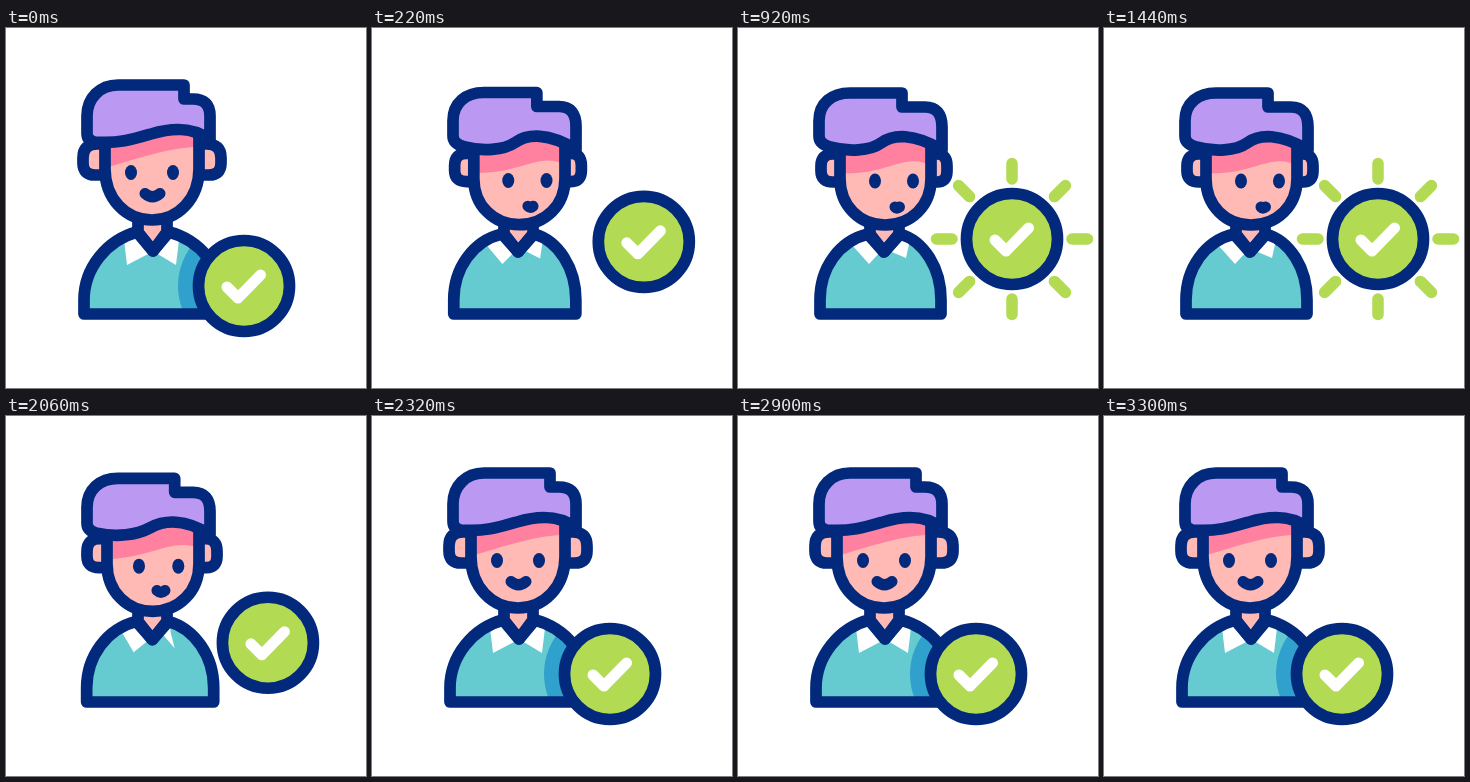
An HTML page with a canvas for the animation above (3.4 s loop, 360 px wide and 360 px high).

```html
<!DOCTYPE html>
<html lang="en">
<head>
<meta charset="utf-8">
<title>Approved user</title>
<style>
  html, body { margin: 0; width: 100%; height: 100%; overflow: hidden; background: #fff; }
  canvas { display: block; }
</style>
</head>
<body>
<canvas id="stage" width="360" height="360"></canvas>
<script>
const ctx = document.getElementById('stage').getContext('2d');
const LOOP = 3400;
const NAVY = '#02297b', SKIN = '#ffbab5', GREEN = '#b2da52', WHITE = '#fff';

// Each shape: path at rest, path when turned towards the raised badge.
const shapes = {
  body: ['M78 286 V272 C78 240 101 212 131 204 L147 223 L163 204 C194 212 217 240 217 272 V286 Z',
         'M82 286 V272 C82 240 101 213 130 206 L146 224 L162 206 C186 213 203 240 203 272 V286 Z'],
  collar: ['M118 212 L121 237 L144 225 L128 206 Z M173 212 L170 237 L150 225 L165 206 Z',
           'M114 217 L131 236 L144 222 L128 208 Z M149 222 L168 230 L172 212 L163 206 Z'],
  neck: ['M132 190 V204 L147 223 L161 204 V190',
         'M132 194 V206 L146 224 L161 206 V194'],
  ears: ['M99 116 H91 Q77 116 77 130 V135 Q77 147 89 147 H99 M193 116 H201 Q215 116 215 130 V135 Q215 147 203 147 H193',
         'M101 126 H95 Q83 126 83 138 V143 Q83 154 95 154 H102 M192 126 H199 Q209 126 209 138 V143 Q209 154 199 154 H192'],
  head: ['M99 100 V141 C99 171 120 192 146 192 C172 192 193 171 193 141 V98',
         'M102 108 V151 C102 178 122 197 147 197 C173 197 193 178 193 151 V102'],
  fringe: ['M99 95 H193 V119 C165 119 137 129 99 140 Z',
           'M101 100 H197 V140 C168 121 152 148 101 145 Z'],
  hair: ['M178 57 H112 C94 57 81 70 81 88 V105 Q81 113 89 114 C112 116 128 111 145 106 C165 100 186 98 204 112 V88 Q204 71 187 71 H178 Z',
         'M164 65 H112 C94 65 81 75 81 93 V108 Q81 116 92 119 C110 124 132 123 143 115 C155 106 176 105 204 122 V99 Q204 79 187 79 H164 Z'],
  mouth: ['M139 165.5 Q146.5 172 154 165.5', 'M157 179 Q159 181 161.5 179']
};

const lerp = (a, b, u) => a + (b - a) * u;
const smooth = u => (u = Math.min(1, Math.max(0, u)), u * u * (3 - 2 * u));
const ramp = (t, from, to) => smooth((t - from) / (to - from));
// Goes up between two times, and back down in mirrored time.
const there = (t, from, to) => Math.min(ramp(t, from, to), ramp(2220 - t, from, to));

function morph([a, b], u) {
  const ends = b.match(/[\d.]+/g);
  let i = 0;
  return new Path2D(a.replace(/[\d.]+/g, n => lerp(+n, +ends[i++], u)));
}

function paint(path, fill, stroke, width = 11.7) {
  if (fill) { ctx.fillStyle = fill; ctx.fill(path); }
  if (stroke) { ctx.strokeStyle = stroke; ctx.lineWidth = width; ctx.stroke(path); }
}

function clipped(clip, draw) {
  ctx.save();
  ctx.clip(clip);
  draw();
  ctx.restore();
}

function oval(x, y, rx, ry = rx) {
  const path = new Path2D();
  path.ellipse(x, y, rx, ry, 0, 0, Math.PI * 2);
  return path;
}

function drawPerson(u, badgeX, badgeY) {
  const p = {};
  for (const name in shapes) p[name] = morph(shapes[name], u);

  paint(p.body, '#65cbd0');
  clipped(p.body, () => {
    paint(oval(badgeX, badgeY, 66), '#30a0cc');
    paint(p.collar, WHITE);
  });
  paint(p.neck, SKIN, NAVY);
  paint(p.body, null, NAVY);
  paint(p.ears, SKIN, NAVY);
  paint(p.head, SKIN);
  clipped(p.head, () => paint(p.fringe, '#ff809f'));
  paint(p.head, null, NAVY);
  paint(p.hair, '#bb99f2', NAVY);

  const eyeY = lerp(144.5, 153, u);
  paint(oval(lerp(125, 137, u), eyeY, 6, 7.5), NAVY);
  paint(oval(lerp(167, 175, u), eyeY, 6, 7.5), NAVY);
  paint(p.mouth, null, NAVY, 11);
}

function drawBadge(x, y, rays) {
  ctx.save();
  ctx.translate(x, y);
  paint(oval(0, 0, 45.5), GREEN, NAVY);
  paint(new Path2D('M-17 1 L-6 12 L16.5 -11'), null, WHITE, 11);
  if (rays > 0) {
    const ray = new Path2D(`M60 0 H${60.01 + 15.5 * rays}`);
    for (let i = 0; i < 8; i++) {
      paint(ray, null, GREEN, 11.5 * Math.min(1, rays * 12));
      ctx.rotate(Math.PI / 4);
    }
  }
  ctx.restore();
}

function frame() {
  const t = performance.now() % LOOP;
  const turn = there(t, 0, 260), rays = there(t, 432, 645);
  const x = lerp(238, 274, turn), y = lerp(258, 211, turn);
  ctx.fillStyle = WHITE;
  ctx.fillRect(0, 0, 360, 360);
  ctx.lineCap = ctx.lineJoin = 'round';
  drawPerson(turn, x, y);
  drawBadge(x, y, rays);
  requestAnimationFrame(frame);
}
frame();
</script>
</body>
</html>
```
